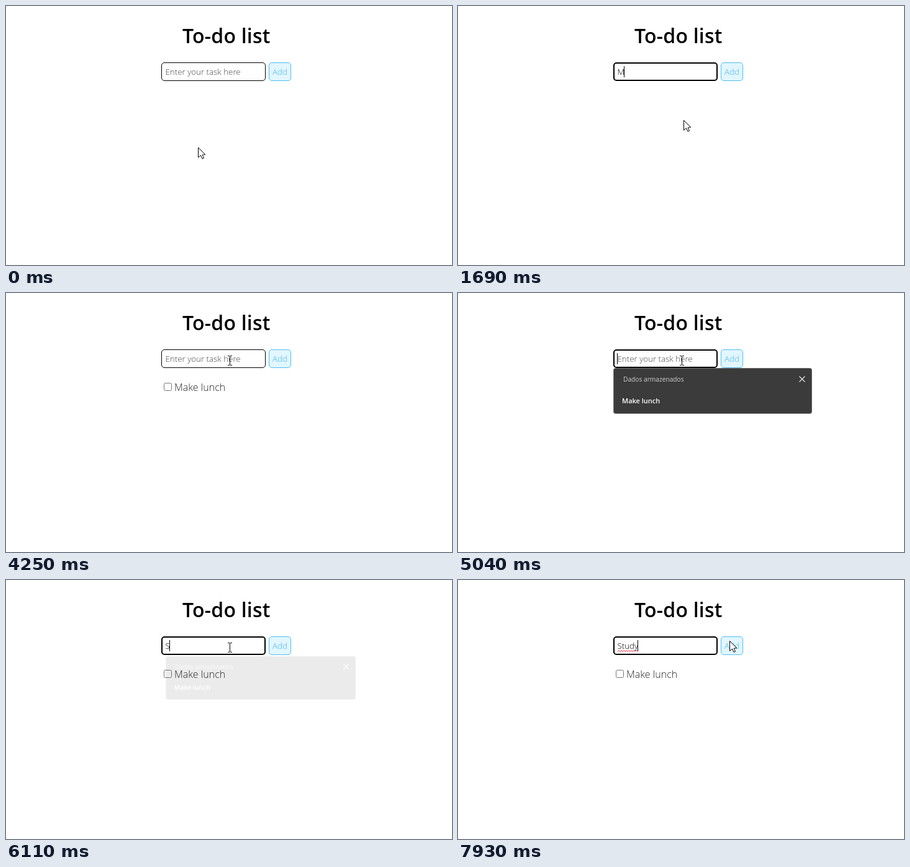
An HTML page with a canvas for the animation above (8000 ms loop, 718 by 418 pixels).

```html
<!DOCTYPE html>
<html lang="en">
<head>
<meta charset="utf-8">
<title>To-do list</title>
<style>
html, body { margin: 0; width: 718px; height: 418px; overflow: hidden; background: #fff; }
canvas { display: block; }
</style>
</head>
<body>
<canvas id="stage" width="718" height="418"></canvas>
<script>
// An opaque canvas allows subpixel text
const stage = document.getElementById('stage').getContext('2d', { alpha: false });
const LOOP = 8000;
const TICK = 67;
const BLINK = 499;
const FAMILY = '"Open Sans", "Noto Sans", sans-serif';
const FIELD = { x: 250, y: 91, w: 168, h: 30 };
const FIELD_FONT = `300 13.333px ${FAMILY}`;

// Each session: focus, first key, second key, last key, spelling mark, submit
const sessions = [
  { text: 'Make lunch', focus: 830, first: 1690, second: 1774, last: 2570, mark: 2070, submit: 3780 },
  { text: 'Study', focus: 4990, first: 5980, second: 6590, last: 6930, mark: 7457, submit: LOOP }
];

// Pointer strokes along Bezier curves
const strokes = [
  { start: 0, end: 560, points: [[309, 228], [318, 165], [344, 116]] },
  { start: 830, end: 1030, points: [[344, 116], [350, 145], [363, 184]] },
  { start: 3054, end: 3580, points: [[363, 184], [385, 21], [438, 98]] },
  { start: 3780, end: 4250, points: [[438, 98], [405, 148], [360, 109]] },
  { start: 7390, end: 7930, points: [[360, 109], [430, 3], [530, 194], [437, 98]] }
];

function bezier(points, u) {
  if (points.length === 1) return points[0];
  const mix = points.slice(1).map((q, i) => q.map((v, k) => points[i][k] + (v - points[i][k]) * u));
  return bezier(mix, u);
}

function pointerAt(t) {
  const { start, end, points } = strokes.findLast(s => s.start <= t);
  const steps = Math.round((end - start) / TICK);
  const u = Math.min(1, Math.floor((t - start) / (end - start) * steps + 0.01) / steps);
  return bezier(points, u).map(Math.round);
}

// Number of typed characters and the time of the last keystroke or focus
function typing({ text, focus, first, second, last }, t) {
  if (t < first) return { count: 0, since: focus };
  if (t < second) return { count: 1, since: first };
  const gap = (last - second) / (text.length - 2);
  const n = Math.min(text.length - 2, Math.floor((t - second) / gap));
  return { count: n + 2, since: second + n * gap };
}

function label(ctx, text, x, y, font, color, spacing = 0) {
  ctx.font = font;
  ctx.letterSpacing = `${spacing}px`;
  ctx.fillStyle = color;
  ctx.fillText(text, x, y);
}

function box(ctx, x, y, w, h, r, fill, line, width = 1) {
  ctx.beginPath();
  ctx.roundRect(x + width / 2, y + width / 2, w - width, h - width, r - width / 2);
  ctx.fillStyle = fill;
  ctx.fill();
  ctx.strokeStyle = line;
  ctx.lineWidth = width;
  ctx.stroke();
}

function squiggle(x, width) {
  stage.beginPath();
  for (let i = 0; i <= width; i += 2) stage.lineTo(x + i, i % 4 ? 113.5 : 115.5);
  stage.strokeStyle = '#e8192c';
  stage.lineWidth = 1;
  stage.stroke();
}

function drawField(t) {
  const session = sessions.find(s => t >= s.focus && t < s.submit);
  const { x, y, w, h } = FIELD;
  box(stage, x, y, w, h, 5, '#fff', '#000', session ? 2 : 1);
  box(stage, 423, 91, 36, 30, 5, '#e1f6fe', '#4fbdf4');
  label(stage, 'Add', 429, 111, FIELD_FONT, '#3fb4f0');

  const { count, since } = session ? typing(session, t) : { count: 0 };
  const typed = session ? session.text.slice(0, count) : '';
  label(stage, typed || 'Enter your task here', 256.5, 111, FIELD_FONT, typed ? '#000' : '#444');
  if (!session) return;
  if (t >= session.mark) squiggle(257, stage.measureText(session.text.split(' ')[0]).width);
  if (Math.floor((t - since) / BLINK) % 2 === 0) {
    stage.fillStyle = '#000';
    stage.fillRect(256 + Math.floor(stage.measureText(typed).width * (count > 0)), 97, 1, 18);
  }
}

function drawTask() {
  box(stage, 254, 145, 13, 13, 2.5, '#fff', '#767676');
  label(stage, 'Make lunch', 271, 158, `300 16px ${FAMILY}`, '#222');
}

// The popup is painted on its own layer so that it fades as a whole
const popup = document.createElement('canvas');
popup.width = 320;
popup.height = 74;

function paintPopup() {
  const ctx = popup.getContext('2d');
  ctx.clearRect(0, 0, 320, 74);
  box(ctx, 0, 0, 320, 74, 3.5, '#3b3b3b', '#707070');
  label(ctx, 'Dados armazenados', 16, 22, `400 10.2px ${FAMILY}`, '#d0d0d0');
  label(ctx, 'Make lunch', 14, 57, `600 11px ${FAMILY}`, '#fff');
  ctx.beginPath();
  for (const side of [-4.5, 4.5]) {
    ctx.moveTo(304 - side, 13.5);
    ctx.lineTo(304 + side, 22.5);
  }
  ctx.strokeStyle = '#e8e8e8';
  ctx.lineWidth = 1.2;
  ctx.stroke();
}

function drawPopup(t) {
  const { focus, first } = sessions[1];
  if (t < focus) return;
  const opening = t < focus + 50;
  const fade = Math.max(0, Math.floor((t - first) / 65) + 1) * 0.228;
  if (fade >= 1) return;
  const scale = opening ? 0.985 : 1 - 0.065 * fade;
  stage.save();
  stage.globalAlpha = opening ? 0.5 : (1 - fade) ** 2;
  stage.translate(410, 157.5);
  stage.scale(scale, scale);
  stage.drawImage(popup, -160, -36.5);
  stage.restore();
}

function drawBeam() {
  stage.fillStyle = '#000';
  stage.fillRect(0, -7, 1, 14);
  for (const edge of [-8, 7]) {
    stage.fillRect(-3, edge, 3, 1);
    stage.fillRect(1, edge, 3, 1);
  }
}

function drawArrow() {
  const outline = [[0, 0], [0, 16], [4, 12.5], [6.5, 18], [9, 17], [6.7, 11.7], [11.3, 11.3]];
  stage.beginPath();
  outline.forEach(([x, y]) => stage.lineTo(x + 0.5, y + 0.5));
  stage.closePath();
  stage.fillStyle = '#fff';
  stage.fill();
  stage.strokeStyle = '#000';
  stage.lineWidth = 1;
  stage.stroke();
}

function drawPointer(t) {
  const [px, py] = pointerAt(t);
  const { x, y, w, h } = FIELD;
  const inside = px >= x && px < x + w && py >= y && py < y + h;
  stage.save();
  stage.translate(px, py);
  inside ? drawBeam() : drawArrow();
  stage.restore();
}

function draw(t) {
  stage.fillStyle = '#fff';
  stage.fillRect(0, 0, 718, 418);
  label(stage, 'To-do list', 284, 60, `600 32px ${FAMILY}`, '#000', 0.2);
  drawField(t);
  if (t >= sessions[0].submit) drawTask();
  drawPopup(t);
  drawPointer(t);
}

let start;
function tick(now) {
  start ??= now;
  draw(Math.max(0, now - start) % LOOP);
  requestAnimationFrame(tick);
}
paintPopup();
draw(0);
requestAnimationFrame(tick);
</script>
</body>
</html>
```
